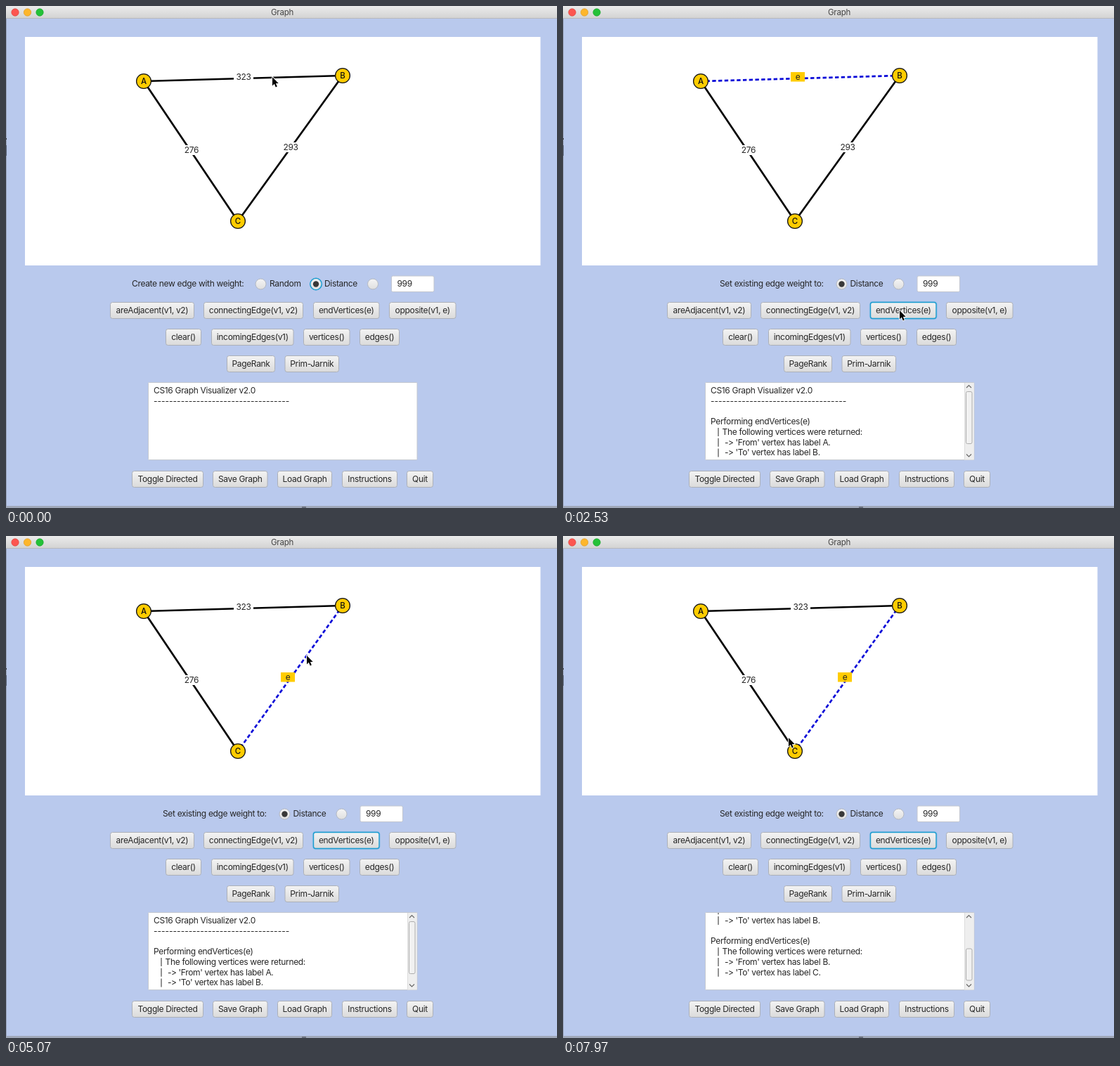
An HTML page with a canvas that plays this animation: 784 by 714 pixels, repeating every 8000 ms.

```html
<!DOCTYPE html>
<html lang="en">
<head>
<meta charset="utf-8">
<title>Graph</title>
<style>
html, body { margin: 0; width: 100%; height: 100%; overflow: hidden; background: #b9c9ed; }
canvas { display: block; width: 784px; height: 714px; }
</style>
</head>
<body>
<canvas id="stage" width="784" height="714"></canvas>
<script>
const ctx = document.getElementById('stage').getContext('2d');
const LOOP = 8000;
const FIRST_PICK = 400, FIRST_CALL = 1600, SECOND_PICK = 4300, SECOND_CALL = 5950;
const FONT = 'Inter, "Open Sans", sans-serif';
const INK = '#262626', FOCUS = '#1a9ccf', GLOW = 'rgba(26, 156, 207, 0.2)', GOLD = '#ffcc00';
const DASH = [5.4, 3.34];

const nodes = { A: [196, 107], B: [479, 99], C: [330, 306] };
const edges = [
  { ends: 'AB', weight: '323', label: [338, 101] },
  { ends: 'AC', weight: '276', label: [264, 205] },
  { ends: 'BC', weight: '293', label: [405, 201] }
];

// Each row: vertical centre, then [left, right, caption]
const buttonRows = [
  [433, [148, 268, 'areAdjacent(v1, v2)'], [281, 423, 'connectingEdge(v1, v2)'],
        [437, 531.5, 'endVertices(e)'], [545, 640.5, 'opposite(v1, e)']],
  [471, [227, 278, 'clear()'], [292, 409.5, 'incomingEdges(v1)'],
        [423, 489.5, 'vertices()'], [503, 560, 'edges()']],
  [509, [314, 383, 'PageRank'], [396.5, 474, 'Prim-Jarnik']],
  [673, [179, 281, 'Toggle Directed'], [294, 372.5, 'Save Graph'],
        [386, 464, 'Load Graph'], [478, 557, 'Instructions'], [570, 608, 'Quit']]
];

// Pointer stops: time, x, y
const stops = [
  [0, 379, 101], [430, 379, 101], [970, 474, 358], [1300, 479, 433], [2560, 479, 433],
  [2980, 199, 108], [3060, 199, 108], [3400, 474, 96], [3830, 440, 175], [4150, 428, 170],
  [5150, 428, 170], [5650, 480, 430], [6600, 480, 430], [7200, 474, 98], [7350, 474, 98],
  [7570, 428, 152], [7970, 321, 287], [8000, 321, 287]
];

function pointerAt(t) {
  const i = Math.max(1, stops.findIndex(s => s[0] >= t));
  const [t0, x0, y0] = stops[i - 1], [t1, x1, y1] = stops[i];
  const u = (t - t0) / (t1 - t0), k = u * u * (3 - 2 * u);
  return [x0 + (x1 - x0) * k, y0 + (y1 - y0) * k];
}

function text(str, x, y, { align = 'left', size = 12, spacing = -0.33, color = INK, weight = 400 } = {}) {
  ctx.font = `${weight} ${size}px ${FONT}`;
  ctx.letterSpacing = spacing + 'px';
  ctx.textAlign = align;
  ctx.textBaseline = 'alphabetic';
  ctx.fillStyle = color;
  ctx.fillText(str, x, y + size * 0.36);
}

function rect(x, y, w, h, color) {
  ctx.fillStyle = color;
  ctx.fillRect(x, y, w, h);
}

function box(x, y, w, h, r, fill, stroke, width = 1) {
  ctx.beginPath();
  ctx.roundRect(x, y, w, h, r);
  ctx.fillStyle = fill;
  ctx.fill();
  ctx.strokeStyle = stroke;
  ctx.lineWidth = width;
  ctx.stroke();
}

function disc(x, y, r, fill, stroke, width = 1) {
  ctx.beginPath();
  ctx.arc(x, y, r, 0, Math.PI * 2);
  ctx.fillStyle = fill;
  ctx.fill();
  if (stroke) {
    ctx.strokeStyle = stroke;
    ctx.lineWidth = width;
    ctx.stroke();
  }
}

function line(points, color, width, dash = []) {
  ctx.beginPath();
  points.forEach(p => ctx.lineTo(...p));
  ctx.setLineDash(dash);
  ctx.lineDashOffset = 1.2;
  ctx.strokeStyle = color;
  ctx.lineWidth = width;
  ctx.stroke();
  ctx.setLineDash([]);
}

function shade(y, h, top, bottom) {
  const g = ctx.createLinearGradient(0, y, 0, y + h);
  g.addColorStop(0, top);
  g.addColorStop(1, bottom);
  return g;
}

function drawWindow() {
  rect(0, 0, 784, 714, '#b9c9ed');
  rect(0, 0, 784, 18, shade(0, 18, '#ebebeb', '#d2d2d2'));
  rect(0, 17, 784, 1, '#b8b8bc');
  rect(0, 18, 1, 696, '#98a3bb');
  rect(0, 188, 1, 2, '#333');
  rect(0, 198, 1, 15, '#596174');
  rect(0, 711, 784, 3, '#a0a8b9');
  rect(421, 712, 6, 2, '#6c7280');
  disc(13, 9, 5.2, '#fc5650', '#df4640', 0.7);
  disc(30.5, 9, 5.2, '#fdb62b', '#dd9b27', 0.7);
  disc(48, 9, 5.2, '#24c138', '#1ca62e', 0.7);
  text('Graph', 393, 9, { align: 'center', size: 11.5, spacing: -0.25, color: '#444' });
  rect(27, 44, 733.5, 325, '#fff');
}

function drawGraph(picked) {
  for (const { ends, weight, label: [x, y] } of edges) {
    const on = ends === picked;
    line([nodes[ends[0]], nodes[ends[1]]], on ? '#0a0ad8' : '#000', 2.7, on ? DASH : []);
    if (on) {
      rect(x - 14, y - 7, 20, 13.5, GOLD);
      text('e', x - 4, y, { align: 'center' });
    } else {
      rect(x - 14, y - 7, 28, 14, '#fff');
      text(weight, x, y, { align: 'center' });
    }
  }
  for (const name in nodes) {
    const [x, y] = nodes[name];
    disc(x, y, 10.4, GOLD, '#151515', 1.3);
    text(name, x, y, { align: 'center', size: 11.5, spacing: 0, color: '#111', weight: 500 });
  }
}

function radio(x, on, focused) {
  const y = 395.5;
  if (focused) disc(x, y, 8.2, '#d9eef8', FOCUS, 1.6);
  disc(x, y, focused ? 6.9 : 7.5, shade(y - 8, 16, '#f6f6f6', '#dedede'), focused ? '#d5dde2' : '#b3b8c1');
  if (on) disc(x, y, 4.2, '#383838');
}

function drawOptions(editing, focused) {
  const y = 395;
  text(editing ? 'Set existing edge weight to:' : 'Create new edge with weight:', editing ? 223 : 179, y);
  if (!editing) {
    radio(362.5, false);
    text('Random', 375, y);
  }
  const shift = editing ? -44.5 : 0;
  radio(441 + shift, true, focused);
  text('Distance', 453 + shift, y);
  radio(522 + shift, false);
  box(548.5 + shift, 384, 60.5, 22.5, 2, '#fff', '#c2c6cf');
  text('999', 556.5 + shift, y);
}

function drawButtons(focused) {
  for (const [y, ...row] of buttonRows) {
    for (const [left, right, caption] of row) {
      const on = caption === focused;
      const frame = [left + 0.5, y - 11.5, right - left - 1, 23, 3];
      const fill = shade(y - 12, 24, '#f4f4f4', '#dadada');
      if (on) box(...frame, fill, GLOW, 3.4);
      box(...frame, fill, on ? FOCUS : '#acb0b8', on ? 1.4 : 1);
      text(caption, (left + right) / 2, y, { align: 'center' });
    }
  }
}

function report(row, from, to, lineY) {
  text('Performing endVertices(e)', 210, lineY(row));
  text('The following vertices were returned:', 226.5, lineY(row + 1));
  [`'From' vertex has label ${from}.`, `'To' vertex has label ${to}.`].forEach((s, i) => {
    const y = lineY(row + 2 + i);
    text('-', 230, y);
    text('>', 235, y);
    text(s, 245.5, y);
  });
  for (let i = 1; i <= 3; i++) rect(220.5, lineY(row + i) - 5.5, 1, 12, INK);
}

function drawLog(calls) {
  box(202.5, 535.5, 382.5, 110, 1, '#fff', '#c4c8d0');
  ctx.save();
  ctx.beginPath();
  ctx.rect(203, 536, 368, 109);
  ctx.clip();
  const top = calls > 1 ? 546.5 - 6 * 14.75 : 546.5;
  const lineY = row => top + row * 14.75;
  text('CS16 Graph Visualizer v2.0', 210, lineY(0));
  text('-'.repeat(35), 210, lineY(1), { spacing: 0 });
  if (calls > 0) report(3, 'A', 'B', lineY);
  if (calls > 1) report(8, 'B', 'C', lineY);
  ctx.restore();
  if (calls > 0) drawScrollbar(calls > 1 ? [587, 45] : [548.5, 74]);
}

function drawScrollbar([y, h]) {
  rect(571, 536, 13.5, 109.5, '#eeeeee');
  rect(571, 536, 1, 109.5, '#dcdcdc');
  box(573.5, y, 8.5, h, 2, '#f1f1f1', '#adadad');
  line([[574, 543], [577.5, 539.5], [581, 543]], '#666', 1.1);
  line([[574, 637.5], [577.5, 641], [581, 637.5]], '#666', 1.1);
}

function drawPointer([x, y]) {
  const shape = [[0, 0], [0, 12.4], [2.8, 9.8], [4.8, 14.4], [6.8, 13.5], [4.9, 9], [8.7, 9]];
  ctx.save();
  ctx.translate(x, y);
  ctx.beginPath();
  shape.forEach(p => ctx.lineTo(...p));
  ctx.closePath();
  ctx.lineJoin = 'round';
  ctx.strokeStyle = '#fff';
  ctx.lineWidth = 1.8;
  ctx.stroke();
  ctx.fillStyle = '#000';
  ctx.fill();
  ctx.restore();
}

function render(t) {
  const picked = t < FIRST_PICK ? '' : t < SECOND_PICK ? 'AB' : 'BC';
  const calls = (t >= FIRST_CALL) + (t >= SECOND_CALL);
  drawWindow();
  drawGraph(picked);
  drawOptions(picked !== '', calls === 0);
  drawButtons(calls > 0 ? 'endVertices(e)' : '');
  drawLog(calls);
  drawPointer(pointerAt(t));
}

const start = performance.now();
function frame() {
  render((performance.now() - start) % LOOP);
  requestAnimationFrame(frame);
}
frame();
</script>
</body>
</html>
```
